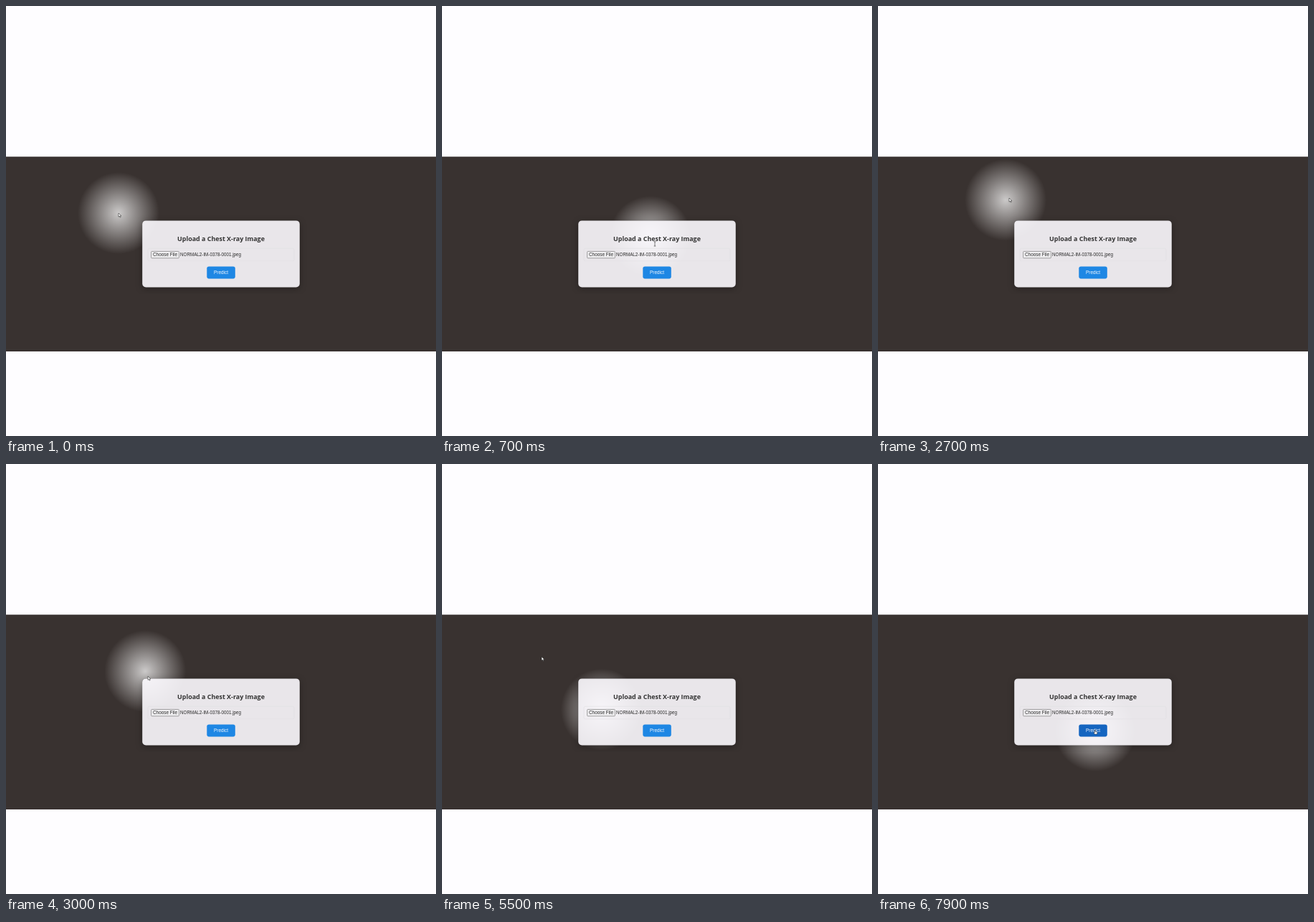
An HTML page for the animation above (8000 ms loop, 600 px wide and 600 px high).

```html
<!DOCTYPE html>
<html lang="en">
<head>
<meta charset="utf-8">
<title>Upload form</title>
<style>
  html, body { margin: 0; width: 100%; height: 100%; overflow: hidden; background: #fefdff; }
  svg { display: block; width: 100vw; height: 100vh; }
  text { font-family: "Liberation Sans", Arial, sans-serif; fill: #2b2b2b; }
  .title { font: bold 8.92px "Open Sans", "Noto Sans", sans-serif; fill: #333; }
  .shadow { filter: drop-shadow(0 2px 5px rgba(0, 0, 0, .3)); }
</style>
</head>
<body>
<svg viewBox="0 0 600 600">
  <defs>
    <radialGradient id="light">
      <stop offset="0" stop-color="#fff" stop-opacity=".74"/>
      <stop offset="1" stop-color="#fff" stop-opacity="0"/>
    </radialGradient>
    <clipPath id="band"><rect y="210.2" width="600" height="271.7"/></clipPath>
    <rect id="card" x="190.2" y="299.4" width="219.6" height="93" rx="5"/>
    <mask id="outside">
      <rect width="600" height="600" fill="#fff"/>
      <use href="#card" fill="#000"/>
    </mask>
  </defs>

  <g clip-path="url(#band)">
    <rect width="600" height="600" fill="#393230"/>
    <circle id="glow" r="57" fill="url(#light)"/>
  </g>

  <g mask="url(#outside)"><use class="shadow" href="#card"/></g>
  <use href="#card" fill="#fcfafe" fill-opacity=".9"/>

  <text class="title" x="300" y="328" text-anchor="middle">Upload a Chest X-ray Image</text>
  <rect x="198" y="338.2" width="204" height="17.6" rx="2" fill="none" stroke="#e0dee1" stroke-width=".6"/>
  <rect id="choose" x="202.6" y="342.4" width="38.8" height="9.4" rx="1" stroke="#7c7c7c" stroke-width=".7"/>
  <text x="222" y="349.4" font-size="6.37" text-anchor="middle">Choose File</text>
  <text x="243" y="349.2" font-size="6.27">NORMAL2-IM-0378-0001.jpeg</text>
  <rect id="predict" x="280.3" y="363.5" width="39.5" height="16.9" rx="2.8"/>
  <text x="300" y="374.3" font-size="6.4" text-anchor="middle" style="fill:#f4f8fd">Predict</text>

  <path id="arrow" d="M0 0V5.2L1.3 4.1L2.2 6L3.1 5.6L2.3 3.8H3.9Z" fill="#fff" stroke="#222" stroke-width=".55"/>
  <path id="beam" d="M-1.3 -3H1.3M0 -3V3M-1.3 3H1.3" fill="none" stroke="#444" stroke-width=".7"/>
  <path id="hand" d="M-.6 -.4Q0 -1 .6 -.4V1.6L2.6 2.1Q3.2 2.4 3 3.3L2.4 5H-.6L-2 2.9Q-1.9 2 -.6 2.8Z"
    fill="#fff" stroke="#222" stroke-width=".5"/>
</svg>
<script>
  const LOOP = 8000, STEP = 100, LAG = 75;
  const DIALOG_OPEN = 3600, DIALOG_CLOSED = 7200;

  // Pointer stops: time, x, y
  const stops = [
    [0, 157, 289], [500, 280, 305], [700, 297, 332], [900, 284, 345],
    [1800, 281, 345], [2500, 170, 275], [2700, 183, 268], [3500, 223, 343],
    [4400, 213, 331], [5000, 213, 331], [5500, 139, 269], [6400, 139, 250],
    [7100, 139, 250], [7800, 303, 372]
  ];

  const el = id => document.getElementById(id);
  const glow = el("glow"), choose = el("choose"), predict = el("predict");
  const pointers = { arrow: el("arrow"), beam: el("beam"), hand: el("hand") };

  function pointerAt(t) {
    const i = stops.findIndex(s => s[0] > t);
    if (i < 0) return stops[stops.length - 1].slice(1);
    const [t0, x0, y0] = stops[i - 1], [t1, x1, y1] = stops[i];
    const k = (t - t0) / (t1 - t0);
    return [x0 + (x1 - x0) * k, y0 + (y1 - y0) * k];
  }

  // The light trails the pointer and stays put while the file dialog is open.
  function glowAt(t) {
    const seen = t < DIALOG_CLOSED ? Math.min(t, DIALOG_OPEN) : t;
    return pointerAt(Math.max(0, seen - LAG));
  }

  const inside = ([x, y], l, t, r, b) => x >= l && x <= r && y >= t && y <= b;
  const place = (node, [x, y]) => node.setAttribute("transform", `translate(${x} ${y})`);

  function draw(now) {
    const t = Math.floor((now % LOOP) / STEP) * STEP;
    const tip = pointerAt(t);
    const onPredict = inside(tip, 281, 364, 319, 380);
    const onTitle = inside(tip, 239, 317, 361, 333);
    const kind = onPredict ? "hand" : onTitle ? "beam" : "arrow";

    place(glow, glowAt(t));
    for (const name in pointers) {
      pointers[name].style.display = name === kind ? "" : "none";
    }
    place(pointers[kind], tip);
    choose.setAttribute("fill", inside(tip, 202, 342, 241, 352) ? "#dcdcdd" : "#efeef0");
    predict.setAttribute("fill", onPredict ? "#1565c0" : "#1e87e4");
  }

  const start = performance.now();
  function tick() {
    draw(performance.now() - start);
    requestAnimationFrame(tick);
  }
  tick();
</script>
</body>
</html>
```
